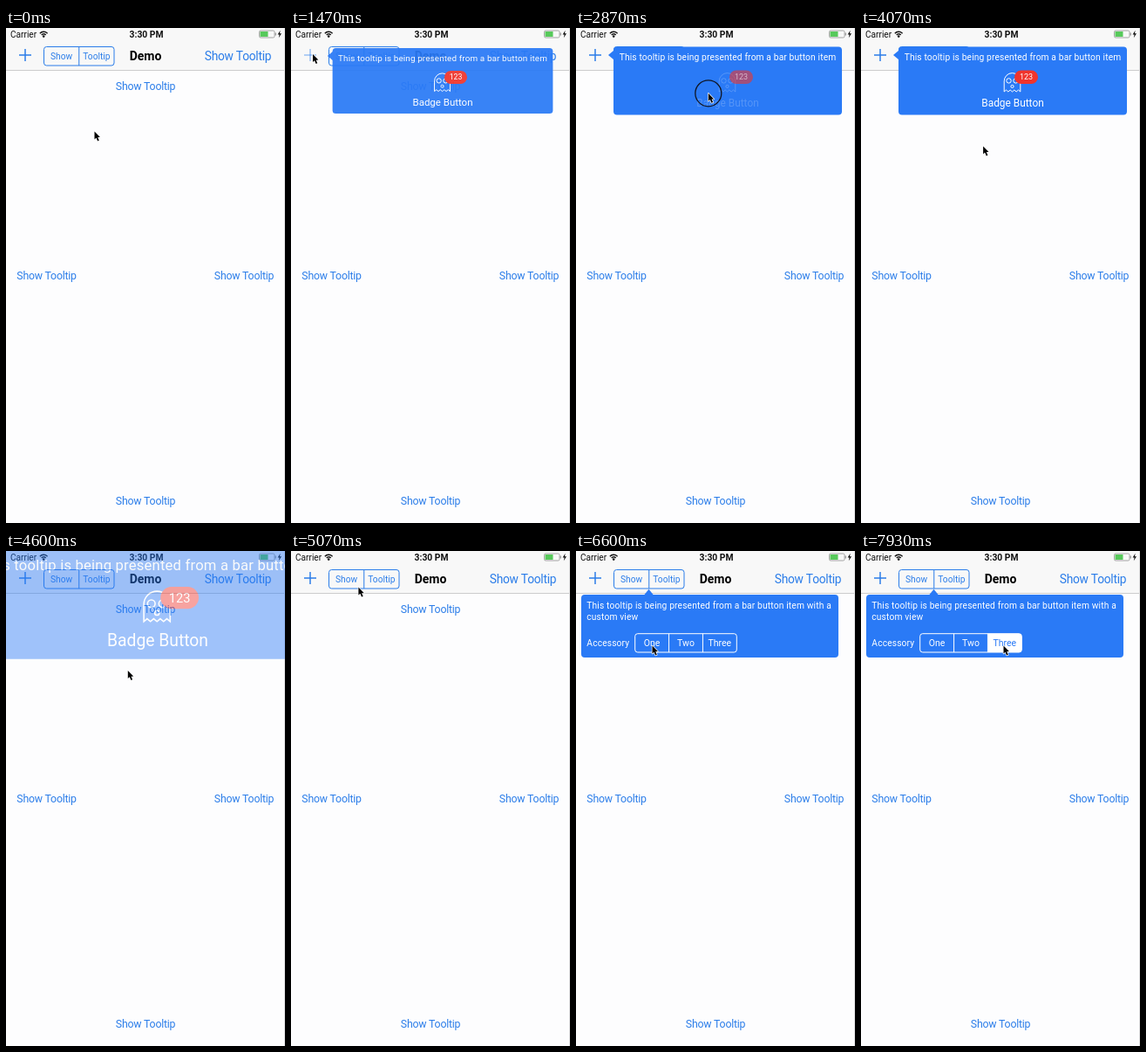
Recreate the animation shown at these times as an HTML page with a canvas. Size 320 by 567 pixels, loop 8 s.

```html
<!DOCTYPE html>
<html lang="en">
<head>
<meta charset="utf-8">
<title>Tooltip demo</title>
<style>
  html, body { margin: 0; width: 100%; height: 100%; overflow: hidden; background: #fdfdfe; }
  canvas { display: block; width: 320px; height: 567px; }
</style>
</head>
<body>
<canvas id="stage"></canvas>
<script>
const W = 320, H = 567, LOOP = 8000, FADE = 300, PRESS = 130;
const BLUE = '#2a7af6', TINT = '#2b7de9', WHITE = '#fff', INK = '#111';
const ratio = window.devicePixelRatio || 1;

function surface(canvas) {
  canvas.width = W * ratio;
  canvas.height = H * ratio;
  return canvas.getContext('2d');
}
const screen2d = surface(document.getElementById('stage'));
const layer2d = surface(document.createElement('canvas'));
let ctx = screen2d;

const clamp = v => Math.max(0, Math.min(1, v));
const progress = (t, start, length) => clamp((t - start) / length);
const easeOut = u => 1 - (1 - u) ** 3;
const easeInOut = u => u * u * (3 - 2 * u);

// Release time and place of each click; the pointer travels in between
const start = { t: 0, x: 101.5, y: 118.5 };
const openFirst = { t: 1295, x: 25, y: 30 };
const badgeTap = { t: 2980, x: 151.8, y: 74.8 };
const outside = { t: 4450, x: 139.8, y: 137 };
const openSecond = { t: 5390, x: 67.5, y: 26.5 };
const picks = [0, 1, 2].map(i => ({ t: 6820 + 520 * i, x: 87.5 + 38 * i, y: 108.5 }));
const clicks = [openFirst, badgeTap, outside, openSecond, ...picks];
const pressed = (t, click) => t >= click.t - PRESS && t < click.t;

function pointerAt(t) {
  const path = [start, ...clicks];
  const i = path.findIndex(p => p.t > t);
  if (i < 0) return path[path.length - 1];
  const from = path[i - 1], to = path[i], gap = to.t - from.t;
  const k = easeInOut(progress(t, from.t + gap * 0.2, gap * 0.6));
  return { x: from.x + (to.x - from.x) * k, y: from.y + (to.y - from.y) * k };
}

// y is the middle of the capital letters, track is in em
function text(str, x, y, size, color, { align = 'center', weight = 400, track = 0 } = {}) {
  ctx.font = `${weight} ${size}px Roboto, Inter, sans-serif`;
  ctx.letterSpacing = track * size + 'px';
  ctx.textAlign = align;
  ctx.fillStyle = color;
  ctx.fillText(str, x, y + size * 0.355);
}

function roundRect(x, y, w, h, r) {
  ctx.beginPath();
  ctx.roundRect(x, y, w, h, r);
}

function circle(x, y, r) {
  ctx.beginPath();
  ctx.arc(x, y, r, 0, Math.PI * 2);
}

function polygon(points) {
  ctx.beginPath();
  points.forEach(([x, y]) => ctx.lineTo(x, y));
  ctx.closePath();
}

function line(x1, y1, x2, y2) {
  ctx.beginPath();
  ctx.moveTo(x1, y1);
  ctx.lineTo(x2, y2);
  ctx.stroke();
}

function segments(x, y, w, h, labels, size, color, selected = -1) {
  const cell = w / labels.length;
  ctx.strokeStyle = color;
  ctx.lineWidth = 1;
  if (selected >= 0) {
    const last = selected === labels.length - 1;
    ctx.fillStyle = color;
    roundRect(x + selected * cell, y, cell, h, [selected ? 0 : 3, last ? 3 : 0, last ? 3 : 0, selected ? 0 : 3]);
    ctx.fill();
  }
  roundRect(x, y, w, h, 3);
  ctx.stroke();
  labels.forEach((label, i) => {
    const left = x + i * cell;
    if (i) line(left, y, left, y + h);
    text(label, left + cell / 2, y + h / 2, size, i === selected ? BLUE : color);
  });
}

function statusBar() {
  text('Carrier', 5, 7.2, 10.1, INK, { align: 'left' });
  text('3:30 PM', 161, 7.2, 10.3, INK, { weight: 600 });

  ctx.strokeStyle = INK;
  ctx.lineWidth = 1.4;
  for (const r of [3.4, 6]) {
    ctx.beginPath();
    ctx.arc(43.2, 10.3, r, -Math.PI * 0.76, -Math.PI * 0.24);
    ctx.stroke();
  }
  ctx.fillStyle = INK;
  circle(43.2, 9.6, 1.3);
  ctx.fill();

  ctx.strokeStyle = ctx.fillStyle = '#8f8f8f';
  ctx.lineWidth = 0.8;
  roundRect(290.5, 3, 17.5, 8, 1.6);
  ctx.stroke();
  ctx.fillRect(308.6, 5.5, 1.2, 3);
  ctx.fillStyle = '#57c95b';
  ctx.fillRect(291.5, 4, 9, 6);
  ctx.fillStyle = INK;
  polygon([[314.6, 2.8], [311.6, 7.5], [313.6, 7.5], [312.8, 11.2], [316, 6.3], [314, 6.3]]);
  ctx.fill();
}

function page(t) {
  ctx.fillStyle = '#fdfdfe';
  ctx.fillRect(0, 0, W, H);
  ctx.fillStyle = '#f8f8f8';
  ctx.fillRect(0, 0, W, 48.5);
  ctx.fillStyle = '#b9b9bb';
  ctx.fillRect(0, 48.3, W, 0.7);
  ctx.fillStyle = '#d9d9db';
  ctx.fillRect(319, 0, 1, H);
  statusBar();

  const held = t >= openFirst.t - PRESS;
  ctx.globalAlpha = held ? 0.35 + 0.65 * progress(t, openFirst.t + 150, 150) : 1;
  ctx.strokeStyle = TINT;
  ctx.lineWidth = 1.5;
  line(15, 31, 29, 31);
  line(22, 24, 22, 38);
  ctx.globalAlpha = 1;

  segments(43.5, 21.5, 80.5, 21.5, ['Show', 'Tooltip'], 10.2, TINT);
  text('Demo', 160, 31.7, 14, '#000', { weight: 600 });
  const tight = { track: -0.018 };
  text('Show Tooltip', 266, 31.7, 13.75, TINT, tight);
  for (const [x, y] of [[160, 66.7], [46.5, 284], [273, 284], [160, 541.3]])
    text('Show Tooltip', x, y, 12.3, TINT, tight);
}

function ghost(x, y) {
  ctx.strokeStyle = WHITE;
  ctx.lineWidth = 1;
  ctx.beginPath();
  ctx.arc(x, y - 1.5, 9.3, Math.PI, 0);
  for (let i = 0; i <= 8; i++) ctx.lineTo(x + 9.3 * (1 - i / 4), y + (i % 2 ? 8.6 : 10.6));
  ctx.closePath();
  ctx.stroke();
  for (const [dx, dy, r] of [[-4, -2, 2.7], [4, -2, 2.7], [0, 4.5, 1.6]]) {
    circle(x + dx, y + dy, r);
    ctx.stroke();
  }
}

function bubble(x, y, w, h, arrow) {
  ctx.fillStyle = BLUE;
  roundRect(x, y, w, h, 4);
  ctx.fill();
  polygon(arrow);
  ctx.fill();
}

function badgeTip(t) {
  bubble(43, 21.5, 262, 78, [[37, 31], [43.5, 25.5], [43.5, 36.5]]);
  text('This tooltip is being presented from a bar button item', 174, 33.3, 10.24, WHITE, { track: 0.013 });
  const dim = pressed(t, badgeTap) ? 1 : t < badgeTap.t ? 0 : 1 - progress(t, badgeTap.t, 250);
  ctx.globalAlpha = 1 - 0.8 * dim;
  ghost(173.5, 62.4);
  text('Badge Button', 174, 86.2, 11.9, WHITE);
  ctx.globalAlpha = 1 - 0.4 * dim;
  ctx.fillStyle = '#f0342c';
  roundRect(176, 48.5, 27, 15.5, 7.75);
  ctx.fill();
  text('123', 189.5, 56.2, 9, WHITE);
}

function accessoryTip(t) {
  bubble(6, 50, 295, 72, [[83.5, 43.8], [78, 50.5], [89, 50.5]]);
  const write = (str, y) => text(str, 12.3, y, 10.24, WHITE, { align: 'left', track: 0.015 });
  write('This tooltip is being presented from a bar button item with a', 62);
  write('custom view', 75.7);
  write('Accessory', 105.2);
  const selected = picks.filter(p => t >= p.t).length - 1;
  segments(67.7, 94.7, 116.6, 21.3, ['One', 'Two', 'Three'], 10.5, WHITE, selected);
}

// Draws on a separate layer so that the tooltip fades as one piece
function tooltip(cx, cy, scale, alpha, draw) {
  if (alpha <= 0) return;
  ctx = layer2d;
  ctx.setTransform(1, 0, 0, 1, 0, 0);
  ctx.clearRect(0, 0, W * ratio, H * ratio);
  ctx.scale(ratio, ratio);
  ctx.translate(cx, cy);
  ctx.scale(scale, scale);
  ctx.translate(-cx, -cy);
  draw();
  ctx.globalAlpha = 1;
  ctx = screen2d;
  ctx.globalAlpha = alpha;
  ctx.drawImage(layer2d.canvas, 0, 0, W, H);
  ctx.globalAlpha = 1;
}

function tooltips(t) {
  const first = easeOut(progress(t, openFirst.t, FADE));
  const gone = easeInOut(progress(t, outside.t, FADE));
  const second = easeOut(progress(t, openSecond.t, FADE));
  tooltip(174, 60.5, 0.5 + 0.5 * first + 1.23 * gone, first * clamp(1 - 1.1 * gone), () => badgeTip(t));
  tooltip(153.5, 83, 0.5 + 0.5 * second, second, () => accessoryTip(t));
}

function pointer(t) {
  const { x, y } = pointerAt(t);
  ctx.save();
  ctx.translate(x, y);
  if (clicks.some(c => pressed(t, c))) {
    ctx.strokeStyle = '#101522';
    ctx.lineWidth = 1.3;
    circle(0, 0, 15);
    ctx.stroke();
  }
  polygon([[0, 0], [0, 9], [2, 7.2], [3.6, 11], [5.3, 10.3], [3.7, 6.7], [6.4, 6.6]]);
  ctx.lineJoin = 'round';
  ctx.strokeStyle = WHITE;
  ctx.lineWidth = 1.4;
  ctx.stroke();
  ctx.fillStyle = '#000';
  ctx.fill();
  ctx.restore();
}

function frame() {
  const t = performance.now() % LOOP;
  ctx.setTransform(ratio, 0, 0, ratio, 0, 0);
  page(t);
  tooltips(t);
  pointer(t);
  requestAnimationFrame(frame);
}
frame();
</script>
</body>
</html>
```
